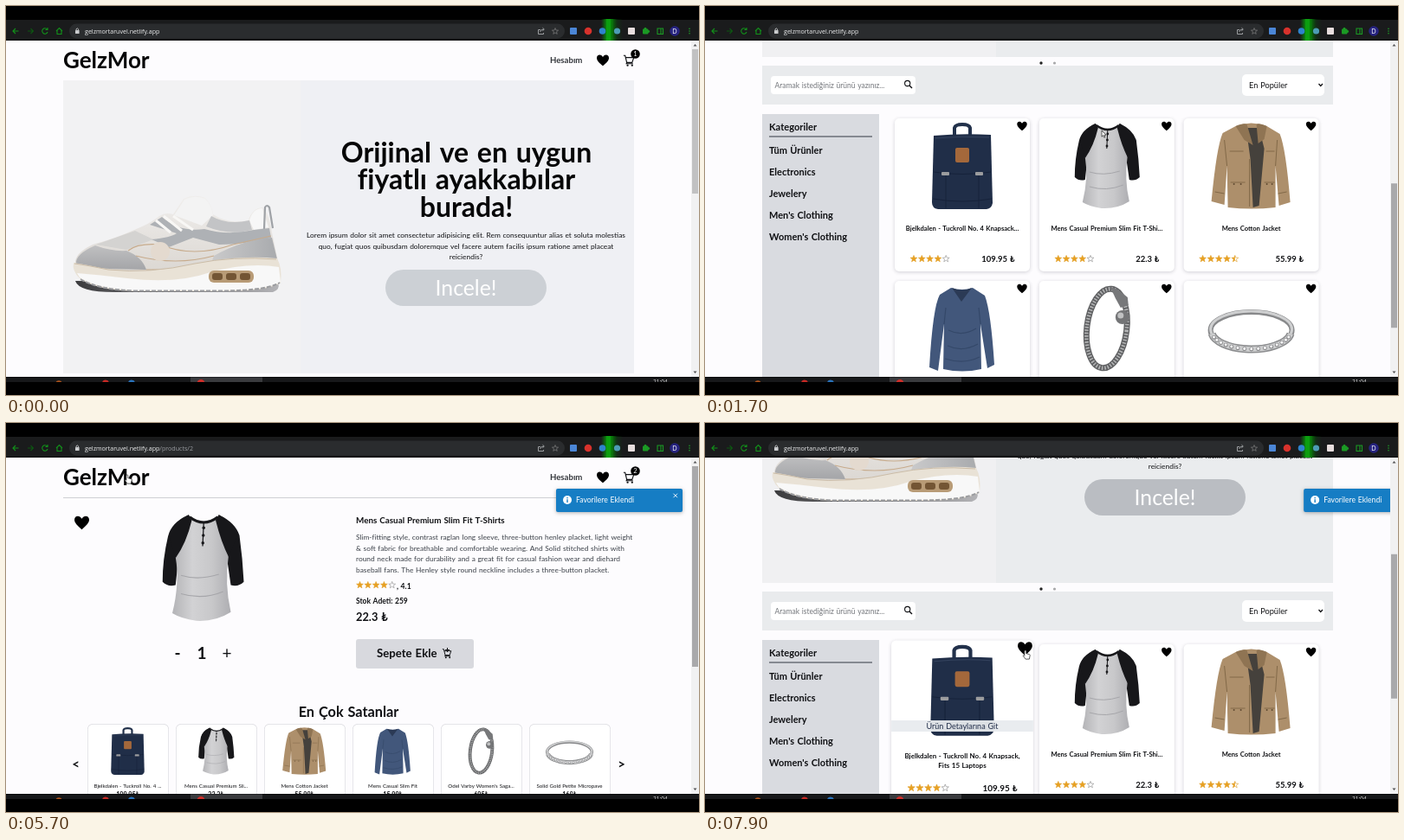
Recreate the animation shown at these times as an HTML page with a canvas. Size 800 by 450 pixels, loop 8 s.

```html
<!DOCTYPE html>
<html lang="tr">
<head>
<meta charset="utf-8">
<title>GelzMor</title>
<style>
html, body { margin: 0; width: 100%; height: 100%; overflow: hidden; background: #000; }
canvas { display: block; width: 800px; height: 450px; }
</style>
</head>
<body>
<canvas id="stage" width="800" height="450"></canvas>
<script>
const ctx = document.getElementById('stage').getContext('2d');
const LOOP = 8000, STEP = 100;
const SANS = 'Lato, "Open Sans", "Noto Sans", sans-serif';
const INK = '#101114';

// Key tables: [time, ...values]
const scrollKeys = [[400, 0], [500, 14], [700, 78], [1000, 197], [1200, 268], [1400, 300],
  [1500, 300], [1700, 366], [1900, 385], [5900, 385], [6200, 0], [6600, 0], [6700, 20],
  [6900, 92], [7100, 150], [7300, 225], [7400, 240]];
const cursorKeys = [[400, 458, 170], [600, 458, 144], [1700, 458, 144], [2400, 463, 208],
  [2900, 463, 208], [3200, 472, 261], [4200, 472, 261], [4800, 87, 113], [5200, 87, 113],
  [5600, 139, 60], [6200, 139, 60], [6600, 382, 276], [7100, 382, 276], [7500, 369, 263]];

const clamp = v => Math.max(0, Math.min(1, v));
const ramp = (t, a, b) => clamp((t - a) / (b - a));
const easeOut = p => 1 - (1 - p) ** 2;

function track(keys, t) {
  if (t <= keys[0][0]) return keys[0].slice(1);
  for (let i = 1; i < keys.length; i++) {
    const a = keys[i - 1], b = keys[i];
    if (t <= b[0]) {
      const p = ramp(t, a[0], b[0]);
      return a.slice(1).map((v, k) => v + (b[k + 1] - v) * p);
    }
  }
  return keys[keys.length - 1].slice(1);
}

function rect(x, y, w, h, c, r = 0) {
  ctx.fillStyle = c;
  ctx.beginPath();
  ctx.roundRect(x, y, w, h, r);
  ctx.fill();
}
function dot(x, y, r, c) {
  ctx.fillStyle = c;
  ctx.beginPath();
  ctx.arc(x, y, r, 0, 7);
  ctx.fill();
}
const fill = (c, d) => { ctx.fillStyle = c; ctx.fill(new Path2D(d)); };
function line(c, w, d) {
  ctx.strokeStyle = c;
  ctx.lineWidth = w;
  ctx.stroke(new Path2D(d));
}
function blend(x0, y0, x1, y1, ...colors) {
  const g = ctx.createLinearGradient(x0, y0, x1, y1);
  colors.forEach((c, i) => g.addColorStop(i / (colors.length - 1), c));
  return g;
}
function text(s, x, y, size, weight = 400, c = INK, align = 'left', font = SANS) {
  ctx.font = `${weight} ${size}px ${font}`;
  ctx.wordSpacing = size * 0.06 + 'px';
  ctx.textAlign = align;
  ctx.fillStyle = c;
  ctx.fillText(s, x, y);
}
function at(x, y, k, draw) {
  ctx.save();
  ctx.translate(x, y);
  ctx.scale(k, k);
  draw();
  ctx.restore();
}
// Scale a drawing around a fixed point
function zoom(x, y, k, draw) {
  at(x, y, k, () => { ctx.translate(-x, -y); draw(); });
}

// Icons
const heart = (x, y, w) => at(x, y, w, () =>
  fill('#000', 'M0 .45C-.3.2-.5 0-.5-.2C-.5-.5-.15-.55 0-.28C.15-.55.5-.5.5-.2C.5 0 .3.2 0 .45Z'));
const cart = (x, y, k) => at(x, y, k, () => {
  line(INK, 1.2, 'M-6.5-6H-4.5L-2.5 2.5H4L6-3.5H-4M-2.5 2.5L-3 4H5');
  dot(-1.5, 6, 1.2, INK);
  dot(4, 6, 1.2, INK);
});
function star(x, y, r, full) {
  ctx.beginPath();
  for (let i = 0; i < 10; i++) {
    const a = i * Math.PI / 5 - Math.PI / 2, q = i % 2 ? r * 0.42 : r;
    ctx.lineTo(x + Math.cos(a) * q, y + Math.sin(a) * q);
  }
  ctx.closePath();
  ctx.strokeStyle = full ? '#dc9a22' : '#8b8b8b';
  ctx.lineWidth = 0.6;
  ctx.stroke();
  ctx.save();
  ctx.clip();
  rect(x - r, y - r, 2 * r * full, 2 * r, '#e7a022');
  ctx.restore();
}
function stars(x, y, n) {
  for (let i = 0; i < 5; i++) star(x + i * 9.3, y, 4.1, clamp(n - i));
}

// Goods, each about 100 units high and centred on x = 0
function backpack() {
  line('#22314b', 4, 'M-9 15V6Q-8 2 0 2Q8 2 9 6V15');
  fill('#202e48', 'M-33 15Q0 12 33 14L35 93Q34 99 28 100H-28Q-35 99-35 92Z');
  line('#16223a', 1, 'M-33 57Q0 62 33 57M-19 58V99M19 58V99M-34 88Q0 94 34 88');
  line('#34435e', 1, 'M-31 18Q0 15 31 17');
  rect(-8, 29, 16, 17, '#a4683b', 2);
  rect(-24, 57, 9, 4, '#9b9c9e', 1);
  rect(15, 57, 9, 4, '#9b9c9e', 1);
}
function shirt() {
  fill('#17171a', 'M-13 1Q-29 8-32 21Q-37 42-37 63Q-32 68-25 66L-22 38L-9 7ZM15 1Q30 8 34 20Q37 42 38 63Q33 68 26 66L22 38L11 7Z');
  fill(blend(-27, 0, 26, 0, '#b5b5b8', '#d2d2d4', '#c8c8ca', '#aeaeb2'),
    'M-12 3Q1 10 14 3Q18 22 24 38Q20 65 26 91Q12 100-6 99Q-20 97-28 92Q-21 64-25 40Q-17 24-12 3Z');
  fill('#17171a', 'M-13 1Q-26 7-31 20L-25 41Q-15 27-10 6ZM15 1Q26 7 32 20L24 40Q17 26 12 6Z');
  line('#17171a', 2.3, 'M-12 3Q1 13 14 3');
  line('#a6a6aa', 1, 'M-20 57Q-4 62 15 56M-20 74Q0 80 19 72');
  line('#17171a', 1, 'M1 8L0 30');
  for (let i = 0; i < 3; i++) dot(1 - i * 0.4, 13 + i * 7, 1.4, '#17171a');
}
function jacket() {
  fill('#ad8f6b', 'M-18 4Q0-3 18 4L33 13Q40 30 45 92L32 96L28 50V98Q0 101-27 98L-28 50L-31 95L-46 91Q-40 28-33 12Z');
  fill('#45413c', 'M-6 6H9L15 30L9 96L2 98L-1 42Z');
  fill('#8f7453', 'M-18 4Q-9 0-5 2L2 26L-8 20ZM18 4Q9 0 6 2L8 24L15 19Z');
  line('#826948', 1, 'M-28 50L-31 20M28 50L30 20M-25 33H-9M17 33H27M-24 69H-7M15 69H27M-2 42V97M-42 80L-31 82M41 80L31 82');
  for (const x of [-20, -12, 18, 24]) dot(x, 71, 1, '#5f4a31');
}
function sweater() {
  fill('#42577b', 'M-13 3Q0 7 12 3L26 12Q33 30 37 92L29 96L21 45L22 97Q0 102-22 97L-21 45L-28 99L-38 95Q-34 25-26 11Z');
  fill('#2b3a55', 'M-12 3L-1 19L11 3Q0 8-12 3Z');
  line('#344869', 1.2, 'M-21 45L-19 26M21 45L19 26M-16 52Q0 60 16 50M-17 70Q0 78 18 68M-20 85Q2 92 20 83');
}
function oval(y, rx, ry, tilt, c, w, dash = [], from = 0, to = 2 * Math.PI) {
  ctx.beginPath();
  ctx.setLineDash(dash);
  ctx.ellipse(0, y, rx, ry, tilt, from, to);
  ctx.strokeStyle = c;
  ctx.lineWidth = w;
  ctx.stroke();
  ctx.setLineDash([]);
}
function bracelet() {
  oval(50, 23, 46, 0.12, '#5f6062', 7);
  oval(50, 23, 46, 0.12, '#b2b3b4', 4.5, [1.6, 1.8]);
  fill('#77787a', 'M4 2L13 5L24 14L25 23L16 26L10 15Z');
  dot(18, 37, 8, '#747577');
  dot(16, 35, 3.5, '#c0c1c2');
}
function ring() {
  oval(52, 47, 21, 0, '#88898b', 6);
  oval(51, 47, 21, 0, '#cfd0d1', 3);
  oval(53, 46, 21, 0, '#8c8d8f', 9, [], 0.15, Math.PI - 0.15);
  oval(53, 46, 21, 0, '#cccdce', 6, [], 0.15, Math.PI - 0.15);
  for (let i = 0; i < 15; i++) {
    const a = 0.35 + i * 0.174, x = Math.cos(a) * 46, y = 53 + Math.sin(a) * 21;
    dot(x, y, 2.4, '#808183');
    dot(x, y - 0.3, 1.6, '#f4f4f5');
  }
}
const goods = [
  { name: 'Bjelkdalen - Tuckroll No. 4 Knapsack...', mini: 'Bjelkdalen - Tuckroll No. 4 ...', price: '109.95', rate: 4, draw: backpack,
    full: ['Bjelkdalen - Tuckroll No. 4 Knapsack,', 'Fits 15 Laptops'] },
  { name: 'Mens Casual Premium Slim Fit T-Shi...', mini: 'Mens Casual Premium Sli...', price: '22.3', rate: 4, draw: shirt,
    full: ['Mens Casual Premium Slim Fit', 'T-Shirts'] },
  { name: 'Mens Cotton Jacket', mini: 'Mens Cotton Jacket', price: '55.99', rate: 4.5, draw: jacket },
  { name: 'Mens Casual Slim Fit', mini: 'Mens Casual Slim Fit', price: '15.99', rate: 2, draw: sweater },
  { name: "Odel Varby Women's Saga Bracelet...", mini: "Odel Varby Women's Saga...", price: '695', rate: 4.5, draw: bracelet },
  { name: 'Solid Gold Petite Micropave', mini: 'Solid Gold Petite Micropave', price: '168', rate: 4, draw: ring }
];

function shoe() {
  fill(blend(78, 0, 318, 0, '#3a3a3c', '#77777a', '#b5b5b8'), 'M80 318Q84 331 125 331H308Q317 328 314 320Z');
  // Upper, tongue and collar
  fill(blend(0, 225, 0, 305, '#efedeb', '#dcd8d3'),
    'M80 298Q79 286 100 276Q126 269 148 259Q166 252 177 243Q184 238 193 241L205 223Q217 217 230 222Q238 231 239 241Q257 253 280 248Q284 234 296 233Q304 240 307 262L314 296L300 306L160 314L84 308Z');
  fill('#f3f3f3', 'M194 242L206 224Q217 218 230 223Q238 231 239 242L226 254Z');
  fill('#f7f7f7', 'M281 248Q285 234 296 234L303 256L286 259Z');
  fill('#c3c4c6', 'M237 243Q256 254 281 248L284 259Q258 266 231 255Z');
  line('#9fa2a6', 2.2, 'M298 258L299 233Q301 229 304 233L308 257');
  // Overlays
  fill(blend(0, 274, 0, 304, '#c3c3c4', '#a5a6a9'), 'M81 298Q80 287 103 277Q122 284 139 283Q157 290 162 305L120 304Q98 303 81 298Z');
  fill('#d4d3d1', 'M104 276L149 260L170 270L139 282Z');
  fill('#aeb1b5', 'M166 253L180 244Q200 262 229 258Q256 266 286 259L304 257L306 268Q276 276 246 276L216 268L188 279L168 270Q190 268 197 263Z');
  fill(blend(240, 0, 312, 0, '#c9c9ca', '#a9abae'), 'M240 289Q274 270 307 268L313 293L288 299L236 300Z');
  line('#f8f7f5', 3, 'M173 248L190 262M182 243L203 260M193 243L216 259');
  line('#c7ab8c', 1.1, 'M141 283Q152 274 178 276Q216 292 262 276L306 266M150 289Q196 301 240 289M162 305Q200 306 236 300');
  dot(178, 284, 11, '#e4dacf');
  // Midsole, window and tread
  fill('#e9e2d6', 'M78 297Q92 299 118 305Q166 310 218 298Q270 288 313 292Q319 303 317 320Q304 330 250 330H146Q102 328 85 315Q76 306 78 297Z');
  fill('#f8f8f8', 'M82 309Q108 311 140 315Q196 322 236 308Q280 296 315 302L317 319Q304 329 250 329H146Q102 326 85 314Z');
  line('#cbbca7', 1, 'M79 298Q94 300 118 305Q166 310 218 298Q262 289 312 293');
  rect(234, 306, 52, 14, '#b89b76', 6);
  for (let i = 0; i < 3; i++) rect(238 + i * 16, 309, 12, 8, '#735534', 3);
  ctx.setLineDash([5, 2]);
  line('#9b9c9f', 2, 'M86 316Q106 328 150 329.500H250Q302 329 316 320');
  ctx.setLineDash([]);
}

function header(count) {
  text('GelzMor', 66, 72, 26, 700, '#050506');
  text('Hesabım', 628, 66, 9.6, 700, '#33363b');
  heart(689, 63, 14);
  cart(719, 63, 0.95);
  dot(726.5, 55.5, 5.3, '#000');
  text(count, 726.5, 58.3, 7.5, 400, '#fff', 'center');
}

function hero(still) {
  rect(66, 86, 659, 339, still ? '#eff0f4' : '#eaecee');
  rect(66, 86, still ? 274 : 270, 339, still ? '#f2f2f3' : '#f0f0f2');
  shoe();
  ['Orijinal ve en uygun', 'fiyatlı ayakkabılar', 'burada!'].forEach((s, i) =>
    text(s, 531.5, 181 + i * 31.3, 32, 700, '#060607', 'center'));
  ['Lorem ipsum dolor sit amet consectetur adipisicing elit. Rem consequuntur alias et soluta molestias',
    'quo, fugiat quos quibusdam doloremque vel facere autem facilis ipsum ratione amet placeat',
    'reiciendis?'].forEach((s, i) => text(s, 531, 268 + i * 12.5, 8.4, 400, INK, 'center'));
  rect(438, 305, 186, 42, still ? '#ccd0d5' : '#babdc2', 21);
  text('Incele!', 531, 334.5, 24.8, 400, '#fff', 'center');
}

function searchBar() {
  dot(388, 432, 1.7, '#222');
  dot(403.5, 432, 1.6, '#a8a8aa');
  rect(66, 435, 659, 45, '#e9ebed');
  rect(76, 447, 167, 21, '#fff', 4);
  text('Aramak istediğiniz ürünü yazınız...', 80.5, 460.5, 8.5, 400, '#74777c');
  ctx.beginPath();
  ctx.arc(233.7, 455.5, 3.1, 0, 7);
  ctx.strokeStyle = INK;
  ctx.lineWidth = 1.1;
  ctx.stroke();
  line(INK, 1.4, 'M236 458L239 461');
  rect(620, 445, 95, 25, '#fff', 5);
  text('En Popüler', 628, 460.5, 9.2, 400, INK);
  line(INK, 1.3, 'M708.5 456L710.700 458.500L713 456');
}

function sidebar() {
  rect(66, 491, 135, 500, '#d9dbe0');
  text('Kategoriler', 74, 509.5, 11.1, 700);
  rect(74, 516, 119, 2, '#858991');
  ['Tüm Ürünler', 'Electronics', 'Jewelery', "Men's Clothing", "Women's Clothing"].forEach((s, i) =>
    text(s, 74, 537 + i * 25, 11, 700));
}

function card(i, hover, heartHover) {
  const g = goods[i], x = 219 + (i % 3) * 166.8, y = 496 + (i > 2 ? 188 : 0), mid = x + 78;
  zoom(mid, y + 88.5, 1 + 0.05 * hover, () => {
    ctx.save();
    ctx.shadowColor = 'rgba(30,30,50,.2)';
    ctx.shadowBlur = 4;
    ctx.shadowOffsetY = 1;
    rect(x, y, 156, 177, '#fff', 5);
    ctx.restore();
    at(mid, y + 5, 1, g.draw);
    heart(x + 147, y + 9, 11.5 + 4.5 * heartHover);
    if (hover > 0) {
      ctx.save();
      ctx.globalAlpha = hover;
      rect(x, y + 88, 156, 12.5, 'rgba(232,235,238,.94)');
      text('Ürün Detaylarına Git', mid, y + 97.3, 8.6, 400, '#1f2c48', 'center');
      ctx.restore();
    }
    const rows = hover > 0.5 && g.full || [g.name];
    rows.forEach((s, k) => text(s, mid, y + 129.5 + k * 10.6, 7.6, 700, INK, 'center'));
    stars(x + 22, y + 162.5, g.rate);
    text(g.price + ' ₺', x + 138.5, y + 166, 9.5, 700, INK, 'right');
  });
}

function home(t, y) {
  const first = ramp(t, 7200, 7500), second = t < 4000 ? ramp(t, 1800, 2100) : 0;
  ctx.save();
  ctx.translate(0, -y);
  header(t < 4000 ? '1' : '2');
  hero(t < 400);
  searchBar();
  sidebar();
  const active = second > 0 ? 1 : 0;
  for (let i = 0; i < 6; i++) if (i !== active) card(i, 0, 0);
  card(active, active ? second : first, active ? 0 : ramp(t, 7300, 7500));
  ctx.restore();
}

function product(t) {
  header(t < 3600 ? '1' : '2');
  rect(66, 86, 659, 1, '#cfd0d4');
  heart(87.5, 115.5, 17);
  at(227, 105, 1.25, shirt);
  text('Mens Casual Premium Slim Fit T-Shirts', 404, 116, 9.85, 700);
  ['Slim-fitting style, contrast raglan long sleeve, three-button henley placket, light weight',
    '& soft fabric for breathable and comfortable wearing. And Solid stitched shirts with',
    'round neck made for durability and a great fit for casual fashion wear and diehard',
    'baseball fans. The Henley style round neckline includes a three-button placket.'
  ].forEach((s, i) => text(s, 404, 135.2 + i * 12.5, 8.4, 400, '#3b4048'));
  stars(408.5, 187.5, 4);
  text(', 4.1', 451, 192, 8.6, 700);
  text('Stok Adeti: 259', 404, 209, 8.5, 700);
  text('22.3 ₺', 404, 229, 12.8, 700);
  text('-', 198, 273, 19, 700, INK, 'center');
  text('1', 226, 273, 19, 700, INK, 'center');
  text('+', 255, 273, 19, 400, INK, 'center');

  const over = t >= 3200 && t < 4300;
  zoom(472, 267, over ? 0.95 : 1, () => {
    rect(404, 250, 136, 34, over ? '#bfc3c9' : '#d8d9de', 3);
    text('Sepete Ekle', 428, 271, 13.2, 700);
    cart(509, 266.5, 0.8);
    line(INK, 1, 'M507 262.500H512M509.500 260V265');
  });

  text('En Çok Satanlar', 395.5, 340, 16.3, 700, INK, 'center');
  text('<', 80.5, 400, 15, 700, INK, 'center');
  text('>', 710.5, 400, 15, 700, INK, 'center');
  goods.forEach((g, i) => {
    const x = 94 + i * 102;
    rect(x, 348, 94, 110, '#dcdce1', 6);
    rect(x + 0.7, 348.7, 92.6, 110, '#fff', 5.5);
    at(x + 46.5, 352, 0.55, g.draw);
    text(g.mini, x + 46.5, 421.5, 6.15, 400, INK, 'center');
    text(g.price + '₺', x + 46.5, 432, 7.2, 700, INK, 'center');
  });
}

function cartToast(t) {
  const p = easeOut(ramp(t, 3500, 3800)) * (1 - ramp(t, 5300, 5600));
  if (p <= 0) return;
  at(-150 * (1 - p), 0, 1, () => {
    ctx.save();
    ctx.shadowColor = 'rgba(0,0,0,.15)';
    ctx.shadowBlur = 3;
    rect(13, 392, 134, 24, '#edf4ed', 2);
    ctx.restore();
    line('#37803b', 1.1, 'M30.500 401A4.500 4.500 0 1 0 31 404M24 403.500L26.300 406L31 400.500');
    text('Ürün başarıyla sepete eklendi.', 39, 406.8, 7.56, 400, '#27472a');
  });
}
function favToast(t) {
  const p = easeOut(ramp(t, 4900, 5200)) * (1 - ramp(t, 6200, 6500)) + easeOut(ramp(t, 7780, 8080));
  if (p <= 0) return;
  at(156 * (1 - p), 0, 1, () => {
    ctx.save();
    ctx.shadowColor = 'rgba(0,0,0,.3)';
    ctx.shadowBlur = 4;
    ctx.shadowOffsetY = 1;
    rect(635, 76, 146, 27, '#167dc4', 2);
    ctx.restore();
    dot(648, 89, 5, '#fff');
    rect(647.3, 88.2, 1.4, 3.8, '#167dc4');
    rect(647.3, 85.9, 1.4, 1.4, '#167dc4');
    text('Favorilere Eklendi', 658, 92, 8.6, 400, '#fff');
    line('#fff', 0.9, 'M770.500 81.700L775 86.200M775 81.700L770.500 86.200');
  });
}

function scrollbar(t, top, h) {
  rect(791, 40, 9, 389, '#f1f1f2');
  rect(792, top, 7, h, t < 400 ? '#c1c1c2' : '#a9a9ab');
  fill('#505052', 'M793.500 46.500L795.500 44L797.500 46.500ZM793.500 422.500L795.500 425L797.500 422.500Z');
}

function chrome(onProduct) {
  const green = '#12921a';
  rect(0, 0, 800, 40, '#000');
  rect(0, 16, 800, 23.5, '#1a1b1c');
  line(green, 1.1, 'M14.500 29H8M11 26L8 29L11 32');
  line('#0c5611', 1.1, 'M25 29H31.500M28.500 26L31.500 29L28.500 32');
  line(green, 1.1, 'M47.500 27A3.200 3.200 0 1 0 48 30M48 25V27.500H45.500M58 29L61.500 25.500L65 29M59 28.500V32.500H64V28.500');
  rect(73, 20.5, 572, 17, '#2a2c2e', 8.5);
  rect(80, 28, 4.6, 4, '#c9cbcd', 0.6);
  line('#c9cbcd', 0.9, 'M81 28V26.800Q82.300 24.800 83.600 26.800V28');
  const host = 'gelzmortaruvel.netlify.app', font = '"Open Sans", "Noto Sans", sans-serif';
  text(host, 91, 31.7, 7.1, 400, '#f0f1f2', 'left', font);
  if (onProduct) text('/products/2', 91 + ctx.measureText(host).width, 31.7, 7.1, 400, '#9a9da1', 'left', font);
  line('#a9abad', 0.9, 'M617 27.500H614.500V32.500H620.500V31M616.500 30Q617 27 621 27M619.500 25.300L621.300 27L619.500 28.700');
  star(634, 29.3, 3.8, 0);

  rect(687, 15, 25, 25, blend(687, 0, 712, 0, 'rgba(8,120,10,0)', '#0a8a0d', '#097a0b', 'rgba(6,80,8,.3)', 'rgba(6,80,8,0)'));
  rect(693, 15, 5, 25, '#0c9e10');
  rect(651, 25, 8, 8, '#4b86d6', 1);
  dot(672, 29, 4.3, '#d8322c');
  dot(688.5, 29, 3.8, '#2e83cd');
  dot(705.5, 29, 3.6, '#4d9db4');
  rect(718, 25, 8, 8, '#e8dede', 1);
  rect(735, 26.5, 6.5, 6, '#1b9a24', 1);
  dot(738, 26.3, 1.5, '#1b9a24');
  dot(741.7, 29.5, 1.4, '#1b9a24');
  line('#1b9a24', 1.1, 'M752 26H758.500V32.500H752ZM756 26V32.500');
  dot(772, 29, 5.8, '#26237f');
  text('D', 772, 31.6, 7, 400, '#fff', 'center');
  for (let i = 0; i < 3; i++) dot(789, 26.3 + i * 2.7, 0.8, '#1fa128');
}

function taskbar() {
  rect(0, 429, 800, 21, '#000');
  ctx.save();
  ctx.beginPath();
  ctx.rect(0, 429, 800, 6);
  ctx.clip();
  rect(0, 429.5, 800, 6, '#17181a');
  rect(213, 429.5, 83, 6, '#3a3b3e');
  dot(61, 437, 3.8, '#b4561c');
  dot(115, 436.5, 4, '#c92a25');
  dot(145, 436.5, 4, '#2a74bd');
  dot(225, 436.5, 4.5, '#d12f2a');
  text('21:04', 747, 437, 6.6, 400, '#e4e4e5', 'left', '"Open Sans", sans-serif');
  ctx.restore();
}

function cursor(t) {
  if (t < 400) return;
  const [x, y] = track(cursorKeys, t);
  const hand = t >= 1900 && t < 2900 || t >= 3200 && t < 4300 || t >= 4800 && t < 5300
    || t >= 5500 && t < 6300 || t >= 7300;
  ctx.lineJoin = 'round';
  if (hand) at(x - 2, y, 0.92, () => {
    const d = 'M3 0C4 0 4.200.6 4.200 1.200V4L8 5C9 5.300 9 6 8.800 7L8 11H3.400L.4 7.200C0 6.400 1 5.800 1.800 6.600L2 6.800V1.200C2 .5 2.300 0 3 0Z';
    fill('#fff', d);
    line('#222', 0.8, d);
  });
  else at(x, y, 0.66, () => {
    const d = 'M0 0V11L2.600 8.600L4.300 12.400L6 11.600L4.300 8H7.600Z';
    fill('#fff', d);
    line('#111', 1, d);
  });
  ctx.lineJoin = 'miter';
}

function draw(t) {
  const onProduct = t >= 2900 && t < 6200;
  const y = track(scrollKeys, t)[0];
  rect(0, 0, 800, 450, '#fdfcfe');
  ctx.save();
  ctx.beginPath();
  ctx.rect(0, 40, 791, 389);
  ctx.clip();
  if (onProduct) product(t); else home(t, y);
  cartToast(t);
  favToast(t);
  ctx.restore();
  scrollbar(t, onProduct ? 50 : 50 + y * 0.424, onProduct ? 232 : 167);
  chrome(onProduct);
  taskbar();
  cursor(t);
}

const start = performance.now();
function loop() {
  const t = (performance.now() - start) % LOOP;
  draw(Math.floor(t / STEP) * STEP);
  requestAnimationFrame(loop);
}
loop();
</script>
</body>
</html>
```
